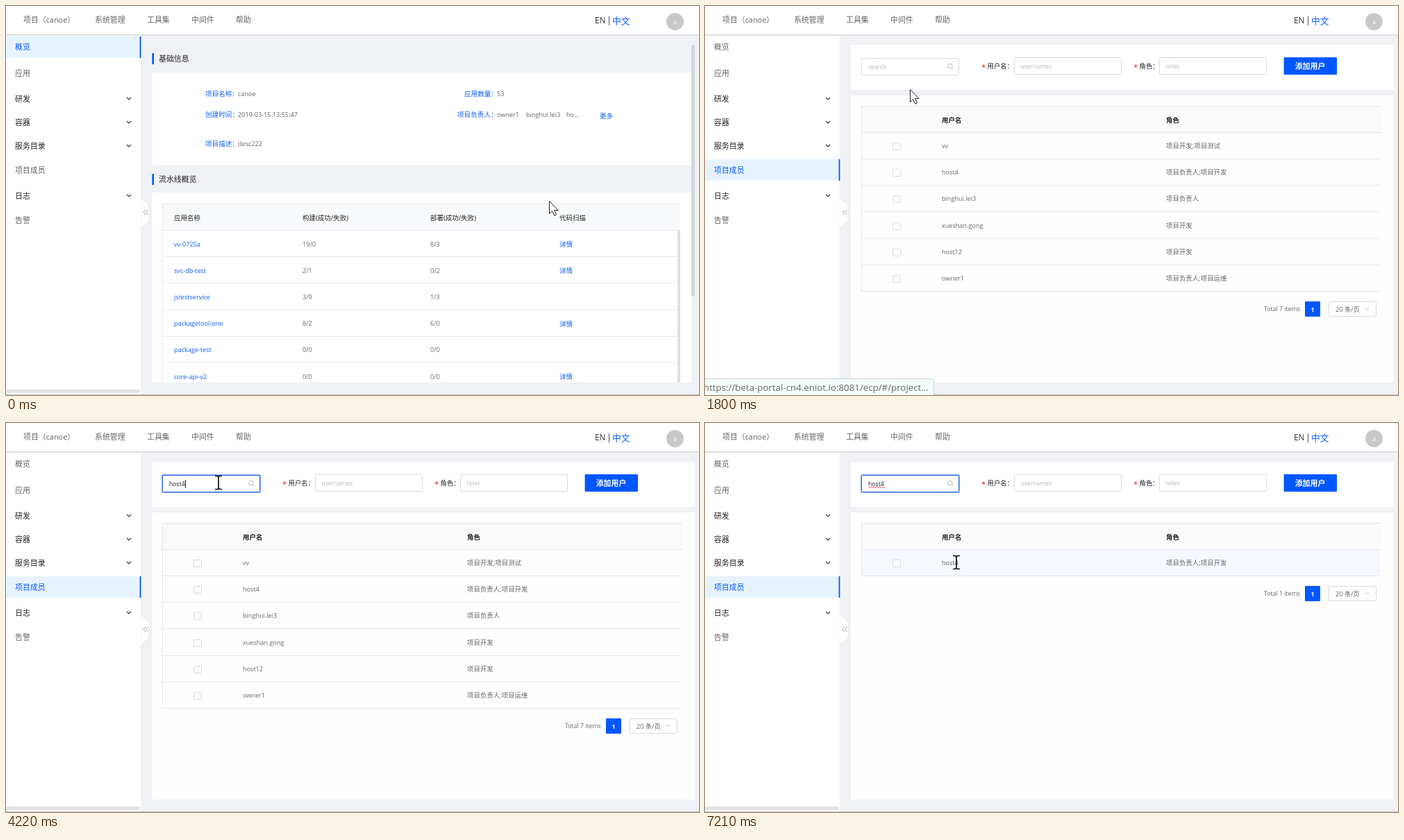
An HTML page for the animation above (7400 ms loop, 998 by 561 pixels).

```html
<!DOCTYPE html>
<html lang="zh-CN">
<head>
<meta charset="utf-8">
<title>项目成员</title>
<style>
  html, body { margin: 0; width: 100%; height: 100%; overflow: hidden; background: #f0f1f4; }
  svg { display: block; width: 998px; height: 561px; }
  text { font-family: "Open Sans", "Noto Sans CJK SC", "Noto Sans CJK", sans-serif; white-space: pre; }
</style>
</head>
<body>
<svg id="stage" viewBox="0 0 998 561"></svg>
<script>
const LOOP = 7400;
const BLUE = '#0a5cff', GRAY = '#666', DARK = '#222', BG = '#f0f1f4', PALE = '#b5b5b5';
const QUERY = 'host4';

// y is the vertical centre of the line
const text = (x, y, str, size = 9.1, fill = GRAY, extra = '') =>
  `<text x="${x}" y="${y + size * 0.37}" font-size="${size}" fill="${fill}" ${extra}>${str}</text>`;
const rect = (x, y, w, h, fill, extra = '') =>
  `<rect x="${x}" y="${y}" width="${w}" height="${h}" fill="${fill}" ${extra}/>`;
const frame = (x, y, w, h, stroke, extra = '') =>
  rect(x + 0.5, y + 0.5, w - 1, h - 1, '#fff', `stroke="${stroke}" rx="1" ${extra}`);
const path = (d, stroke, width = 1, fill = 'none') =>
  `<path d="${d}" stroke="${stroke}" stroke-width="${width}" fill="${fill}"/>`;
const group = (id, body) => `<g id="${id}">${body}</g>`;
const bold = 'font-weight="700"', medium = 'font-weight="500"';

function header() {
  const nav = [[25, '项目（canoe）'], [128, '系统管理'], [203, '工具集'], [267, '中间件'], [331, '帮助']];
  return rect(0, 41, 998, 1, '#d6d7da') + rect(0, 42, 998, 1, '#e4e5e8') +
    rect(0, 0, 998, 41, '#fff') + rect(0, 0, 998, 1, '#f0fbf9') +
    nav.map(([x, label]) => text(x, 20, label, 10.9)).join('') +
    text(848, 21, 'EN', 11.8, '#333') + text(865.3, 21, '|', 11.8, '#333') + text(873, 21, '中文', 12.8, BLUE) +
    '<circle cx="963.5" cy="22.5" r="12.5" fill="#c8c8c8"/>' +
    text(963.5, 23, 'a', 8.5, '#fff', 'text-anchor="middle"');
}

function sidebar() {
  const items = [['应用', 97], ['研发', 134, 1], ['容器', 168, 1], ['服务目录', 202, 1], ['日志', 274, 1], ['告警', 309]];
  const entry = (id, label, y, top) =>
    rect(0, top, 194, 31, '#e6f3ff', `id="${id}Bg"`) +
    rect(192.6, top, 1.8, 31, '#0057ff', `id="${id}Bar"`) +
    text(13, y, label, 10.9, GRAY, `id="${id}Text"`);
  return rect(0, 43, 194, 517, '#fff') +
    '<path d="M194 273C195 284 206 281 206 290V307C206 316 195 313 194 324Z" fill="#fff" stroke="#e3e4e8" stroke-width=".6"/>' +
    rect(190, 270, 4, 56, '#fff') +
    path('M201 294L198 297.5 201 301M204.500 294L201.500 297.500 204.500 301', '#999', 0.9) +
    entry('home', '概览', 59, 44) + entry('team', '项目成员', 237, 221) +
    items.map(([label, y, open]) => text(13, y, label, 10.9, open ? DARK : GRAY, open ? medium : '') +
      (open ? path(`M174 ${y - 2}l3 3 3 -3`, '#333', 1.2) : '')).join('') +
    rect(0, 553, 193, 5, '#e2e2e2', 'rx="2"');
}

function overview() {
  const title = (y, label) => rect(210.4, y - 8, 2.6, 16, '#0057ff') + text(220, y, label, 10.9, DARK);
  const label = (x, y, str) => text(x, y - 0.5, str, 9.6, BLUE);
  const rows = [
    ['vv-0725a', '19/0', '8/3', 1], ['svc-db-test', '2/1', '0/2', 1], ['jstestservice', '3/9', '1/3', 0],
    ['packagetool-one', '8/2', '6/0', 1], ['package-test', '0/0', '0/0', 0], ['core-api-v2', '0/0', '0/0', 1]
  ];
  const head = [[242, '应用名称'], [427, '构建(成功/失败)'], [611, '部署(成功/失败)'], [797, '代码扫描']];
  return title(76, '基础信息') + rect(210, 96, 777, 134, '#fff') +
    label(287, 127, '项目名称：') + text(334, 127, 'canoe') +
    label(660, 127, '应用数量：') + text(707, 127, '53') +
    label(287, 157, '创建时间：') + text(334, 157, '2019-03-15 13:55:47') +
    label(650, 157, '项目负责人：') + text(707, 157, 'owner1') + text(749, 157, 'binghui.lei3') +
    text(807, 157, 'ho...') + text(855, 158, '更多', 9.6, BLUE) +
    label(287, 199, '项目描述：') + text(334, 199, 'desc222') +
    title(250, '流水线概览') + rect(210, 269, 777, 274, '#fff') +
    rect(226, 286, 745, 37, '#f7f9fb') + path('M971 285.5H225.5V543M226 323.5H971', '#e6e8eb') +
    head.map(([x, s]) => text(x, 305, s, 9.5, DARK, medium)).join('') +
    rows.map(([name, build, deploy, scan], i) => {
      const y = 343.5 + i * 38.15;
      return text(242, y, name, 9.1, BLUE) + text(427, y, build) + text(611, y, deploy) +
        (scan ? text(797, y, '详情', 9.6, BLUE) : '') +
        (i < 5 ? path(`M226 ${Math.round(y + 18.6) - 0.5}H967`, '#e6e8eb') : '');
    }).join('') +
    rect(967, 324, 4, 219, '#dfdfdf', 'rx="2"') + rect(987, 56, 5, 363, '#d4d5d8', 'rx="2"');
}

function memberRow(i, name, roles) {
  const y = 202 + Math.round(i * 38.2);
  return frame(270, y - 5, 12, 11, '#d9d9d9') + text(341, y, name) + text(664, y, roles, 9.45) +
    path(`M226 ${y + 18.5}H972`, '#e6e6e6');
}

function members() {
  const dev = '项目开发', lead = '项目负责人';
  const all = [['vv', dev + ';项目测试'], [QUERY, `${lead};${dev}`], ['binghui.lei3', lead],
    ['xueshan.gong', dev], ['host12', dev], ['owner1', lead + ';项目运维']];
  const input = (x, star, label, hint) => text(star, 88, '*', 10, '#f00') + text(star + 8, 87, label, 9.4, DARK) +
    frame(x, 74, 155, 25, '#d9d9d9') + text(x + 9.5, 87, hint, 8.6, PALE);
  const list = rows => rows.map(([name, roles], i) => memberRow(i, name, roles)).join('') +
    path(`M225.5 145V${183 + rows.length * 38.2}`, '#e6e6e6');
  return rect(210, 56, 782, 65, '#fff') + rect(210, 129, 782, 414, '#fefefe') +
    rect(224, 74, 143, 27, 'none', 'id="glow" rx="2"') +
    frame(225, 75, 141, 25, '#d9d9d9', 'id="search"') +
    text(235, 88, 'search', 8.6, PALE, 'id="hint"') + text(235, 88, '', 8.7, DARK, 'id="typed"') +
    rect(235, 82, 1, 12, '#111', 'id="caret"') +
    group('squiggle', path('M235.5 93' + 'q1 -2 2 0t2 0'.repeat(6), '#f23a3a', 0.9)) +
    '<circle cx="353" cy="86.500" r="3.200" fill="none" stroke="#bbb"/>' + path('M355.5 89l2.5 2.500', '#bbb') +
    input(445, 398.5, '用户名：', 'usernames') + input(654, 617.5, '角色：', 'roles') +
    rect(833.6, 74, 76.4, 25, '#0057ff', 'rx="1"') + text(871.5, 87, '添加用户', 10.9, '#fff', bold + ' text-anchor="middle"') +
    group('table',
      rect(226, 145, 749, 37, '#fafafa') + path('M225 144.5H973M226 182.500H975', '#e6e6e6') +
      text(341, 164, '用户名', 9.5, DARK, bold) + text(664, 164, '角色', 9.5, DARK, bold) +
      rect(226, 183, 746, 38, '#f5f8ff', 'id="rowHover"') +
      group('fullList', list(all)) + group('foundList', list([all[1]])) +
      group('pager', text(805, 437, '', 8.75, GRAY, 'id="total"') + rect(864, 426, 22, 22, '#0057ff', 'rx="1"') +
        text(875, 437.5, '1', 8.8, '#fff', bold + ' text-anchor="middle"') + frame(898, 426, 69, 22, '#d9d9d9') +
        text(908, 438, '20 条/页', 9.2) + path('M950 435l3 3 3 -3', '#bbb', 0.9))) +
    group('loading', rect(987, 56, 5, 487, BG) + rect(210, 538, 777, 5, BG) +
      rect(987, 56, 5, 467, '#d4d5d8', 'rx="2"') + rect(210, 538, 762, 5, '#d4d5d8', 'rx="2"') +
      rect(986, 538, 6, 5, '#fff') +
      group('spinner', [0, 1, 2, 3].map(i => {
        const a = i * Math.PI / 2;
        return `<circle cx="${5.7 * Math.cos(a)}" cy="${5.7 * Math.sin(a)}" r="2.8" fill="${i ? '#b3cdfd' : '#a2c1fb'}"/>`;
      }).join('')));
}

const pointer =
  group('arrow', path('M.5 .5V18.500L4.700 14.700 7.800 21.300 10.500 20 7.600 13.500H13Z', '#222', 1, '#fff')) +
  group('beam', path('M-5 -9.500H-1.500L0 -8.500 1.500 -9.500H5M0 -9V9M-5 9.500H-1.500L0 8.500 1.500 9.500H5', '#111', 1.7)) +
  group('hand', path('M-1.500 14V2Q-1.500 .5 0 .5T1.700 2V8Q4 6.500 5 8.500 7.500 7.500 8 9.500 10.500 9 10.500 11.500V16Q10.500 19 8.500 20.500V23.500H-1V21Q-4 18 -7 13.500C-8 11 -5 10.500 -3.500 12.500Z M1.700 8V12M5 9V12.500M8 10V13', '#222', 1.1, '#fff'));

const urlBar = rect(-2, 537.5, 331.5, 26, '#f5fdfc', 'rx="3" stroke="#c9d6d6"') +
  text(-2, 550, 'https://beta-portal-cn4.eniot.io:8081/ecp/#/project...', 13.3);

document.getElementById('stage').innerHTML =
  rect(0, 0, 998, 561, BG) + group('overview', overview()) + group('members', members()) +
  sidebar() + header() + rect(0, 560, 998, 1, '#c2c3c6') +
  group('urlBar', urlBar) + group('pointer', pointer);

const $ = {};
document.querySelectorAll('[id]').forEach(el => { $[el.id] = el; });
const show = (name, on) => $[name].setAttribute('visibility', on ? 'inherit' : 'hidden');
const set = (name, attr, value) => $[name].setAttribute(attr, value);
const within = (t, a, b) => t >= a && t < b;
const clamp = v => Math.min(1, Math.max(0, v));
const smooth = v => v * v * (3 - 2 * v);
const mix = (a, b, p) => `rgb(${a.map((v, i) => Math.round(v + (b[i] - v) * p))})`;
const GRAY_RGB = [102, 102, 102], BLUE_RGB = [10, 92, 255];

// first step, last step, number of steps, end point
const MOVES = [
  [110, 800, 10, 68, 236], [880, 950, 2, 72, 232], [1410, 1800, 6, 295, 120], [1900, 2290, 6, 306, 86],
  [5640, 5788, 3, 355, 178], [5860, 6010, 3, 369, 201], [6250, 6580, 5, 362, 203], [7210, 7210, 1, 362, 201]
];
const KEYS = [3380, 3530, 3700, 3840, 4220];
const CARET = [[2670, 3150], [3380, 4770], [5240, 5720], [6330, 6880]];

function pointerAt(t) {
  let x = 782, y = 281;
  for (const [start, end, steps, toX, toY] of MOVES) {
    if (t < start) break;
    const step = steps > 1 ? Math.floor((t - start) / (end - start) * (steps - 1) + 1e-6) + 1 : 1;
    const p = smooth(clamp(step / steps));
    x += (toX - x) * p;
    y += (toY - y) * p;
  }
  return [x, y];
}

function render(t) {
  const [x, y] = pointerAt(t);
  const opened = t >= 1130, found = t >= 4930;
  const loading = within(t, 1130, 1560) || within(t, 4770, 4930);
  const overMenu = x < 194, overSearch = opened && within(x, 225, 366) && within(y, 75, 100);
  const overName = found && within(x, 341, 366) && within(y, 195, 211);
  const beam = overSearch || overName;

  set('pointer', 'transform', `translate(${x.toFixed(1)} ${y.toFixed(1)})`);
  show('hand', overMenu);
  show('beam', beam);
  show('arrow', !overMenu && !beam);

  const fade = smooth(clamp((t - 1180) / 300));
  const grow = clamp((t - 1130) / 200), shrink = clamp(1 - (t - 1130) / 130);
  set('homeBg', 'opacity', 1 - fade);
  set('homeText', 'fill', mix(BLUE_RGB, GRAY_RGB, fade));
  set('homeBar', 'y', 59.5 - 15.5 * shrink);
  set('homeBar', 'height', 31 * shrink);
  set('teamBg', 'opacity', fade);
  set('teamText', 'fill', opened || overMenu && within(y, 221, 252) ? BLUE : GRAY);
  set('teamBar', 'y', 236.5 - 15.5 * grow);
  set('teamBar', 'height', 31 * grow);
  set('teamBar', 'opacity', grow);

  show('overview', !opened);
  show('members', opened);
  show('loading', loading);
  show('table', !loading);
  show('fullList', !found);
  show('foundList', found);
  show('rowHover', found && within(y, 183, 221));
  set('pager', 'transform', `translate(0 ${found ? -191 : 0})`);
  $.total.textContent = `Total ${found ? 1 : 7} items`;
  const angle = 0.3 * (t < 3000 ? t - 1260 : t - 4770) - (t < 3000 ? 65 : 74);
  set('spinner', 'transform', `translate(614.3 349.2) rotate(${angle.toFixed(1)})`);

  const focus = clamp((t - 2580) / 140);
  set('search', 'stroke', focus > 0 ? '#2868e6' : overSearch ? '#4f8dff' : '#d9d9d9');
  set('glow', 'fill', `rgba(20,90,235,${0.5 * focus})`);
  const typed = QUERY.slice(0, KEYS.filter(k => t >= k).length);
  $.typed.textContent = typed;
  show('hint', !typed);
  show('squiggle', t >= 5330);
  show('caret', opened && CARET.some(([on, off]) => within(t, on, off)));
  set('caret', 'x', Math.round(235 + (typed ? $.typed.getComputedTextLength() : 0)));
  show('urlBar', within(t, 880, 2210));
}

function tick() {
  render(performance.now() % LOOP);
  requestAnimationFrame(tick);
}
tick();
</script>
</body>
</html>
```
